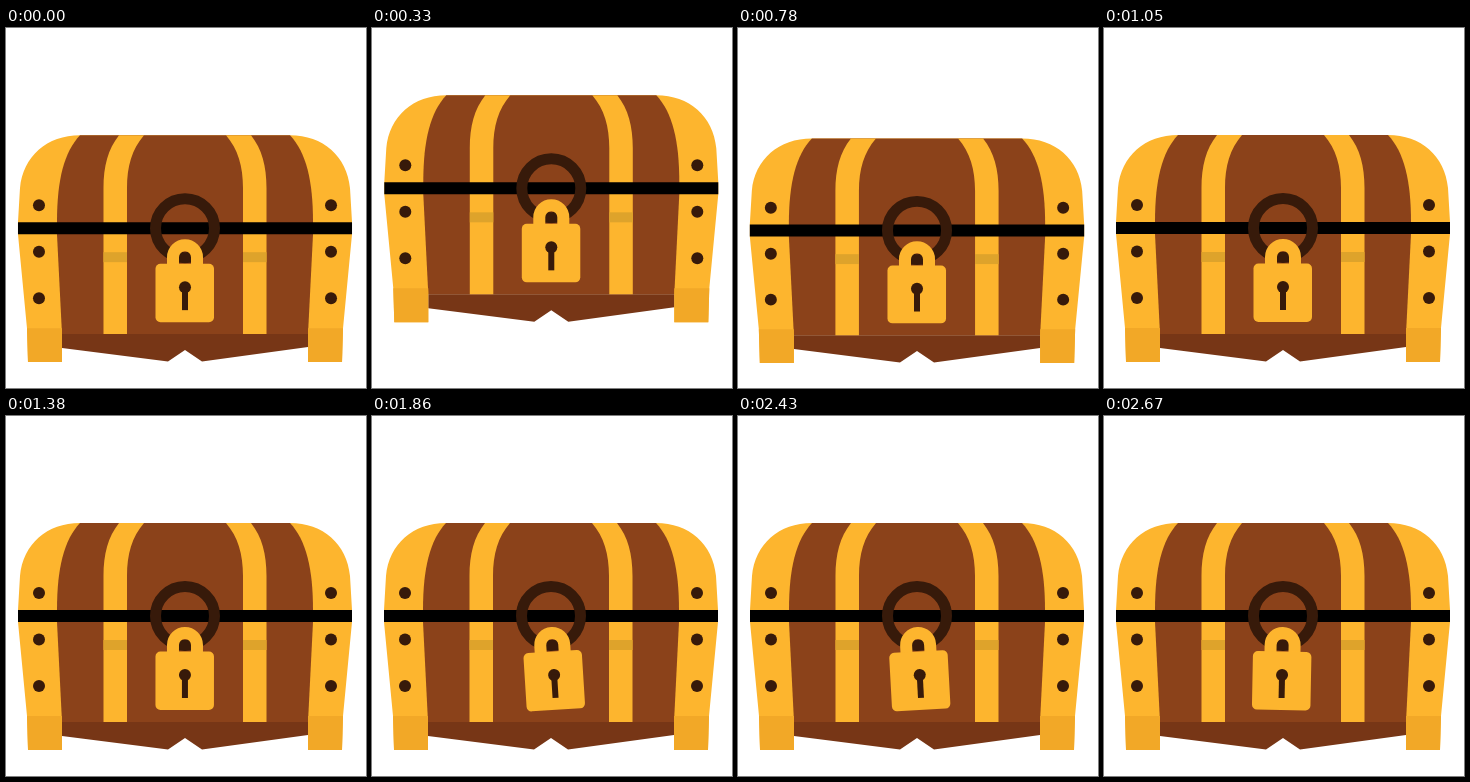
These frames come from a looping animation (360x360 px, 2.7 s). An HTML page:

```html
<!DOCTYPE html>
<html lang="en">
<head>
<meta charset="utf-8">
<title>Treasure chest</title>
<style>
  html, body { margin: 0; width: 100%; height: 100%; overflow: hidden; background: #fff; }
  svg { display: block; width: 100%; height: 100%; }
  .gold { fill: #fdb52e; }
  .shade { fill: #f2a827; }
  .wood { fill: #8b421a; }
  .dark { fill: #371a0a; }
</style>
</head>
<body>
<svg viewBox="0 0 360 360">
  <g id="chest">
    <path class="gold" d="M12 206V194L14 160C17 128 41 107 74 107H284C317 107 341 128 344 160L346 194V206L337 300 336 334H302V306H56V334H22L21 300Z"/>
    <path class="wood" d="M74 107H284C300 124 307 152 307 194V206L302 306H56L51 206V194C51 152 58 124 74 107Z"/>
    <path fill="#773616" d="M56 306H302V319L196 333.500 179 322 162 333.500 56 320Z"/>
    <g id="side">
      <path class="gold" d="M113 107H138C126 121 121 138 121 160V306H97.500V160C97.500 138 102 121 113 107Z"/>
      <path fill="#dea32b" d="M97.500 224H121V234H97.500Z"/>
      <path class="shade" d="M21 300H56V334H22Z"/>
      <g class="dark">
        <circle cx="33" cy="177" r="6"/>
        <circle cx="33" cy="223.500" r="6"/>
        <circle cx="33" cy="270" r="6"/>
      </g>
    </g>
    <use href="#side" transform="translate(358) scale(-1 1)"/>
    <path d="M12 194H346V206H12Z"/>
    <circle cx="179" cy="200" r="29.500" fill="none" stroke="#371a0a" stroke-width="11"/>
    <g id="lock">
      <path d="M167 238V229a12 12 0 0 1 24 0V238" fill="none" stroke="#fdb52e" stroke-width="12"/>
      <rect class="gold" x="149.500" y="235.500" width="58.500" height="58.500" rx="5"/>
      <circle class="dark" cx="179" cy="259" r="6"/>
      <path class="dark" d="M176 259H182V282H176Z"/>
    </g>
  </g>
  <g id="sparks"></g>
</svg>
<script>
const LOOP = 2700;
const chest = document.getElementById('chest');
const lock = document.getElementById('lock');
const layer = document.getElementById('sparks');

const sparks = [[70.5, 34.5, 1710], [70.5, 81.5, 1710], [304.5, 29, 2010]].map(([x, y, start]) => {
  const el = document.createElementNS('http://www.w3.org/2000/svg', 'rect');
  for (const [k, v] of Object.entries({ x: -5.5, y: -5.5, width: 11, height: 11, rx: 3, class: 'gold' }))
    el.setAttribute(k, v);
  layer.append(el);
  return { el, x, y, start };
});

const progress = (t, from, to) => Math.min(1, Math.max(0, (t - from) / (to - from)));
const bump = (t, from, to) => Math.sin(Math.PI * progress(t, from, to));

function draw(t) {
  // Crouch, leap, land with a squash
  const squash = 7 * bump(t, 0, 255) + 6 * bump(t, 770, 1000);
  const rise = 1 - (1 - progress(t, 255, 580)) ** 2;
  const fall = progress(t, 580, 770) ** 2;
  const y = squash - 96 * (rise - fall);
  const x = 0.7 * (rise - fall);
  chest.setAttribute('transform',
    `translate(${179 + x} ${334 + y}) scale(${1 + squash * 0.0012} ${1 - squash * 3 / 227}) translate(-179 -334)`);

  const swing = t < 1380 ? 0 : 3.6 * Math.sin(2 * Math.PI * (t - 1380) / 630);
  lock.setAttribute('transform', `rotate(${swing} 179 209)`);

  for (const { el, x, y, start } of sparks)
    el.setAttribute('transform', `translate(${x} ${y}) scale(${progress(t, start, start + 120)})`);
}

const began = performance.now();
function tick() {
  draw((performance.now() - began) % LOOP);
  requestAnimationFrame(tick);
}
tick();
</script>
</body>
</html>
```
